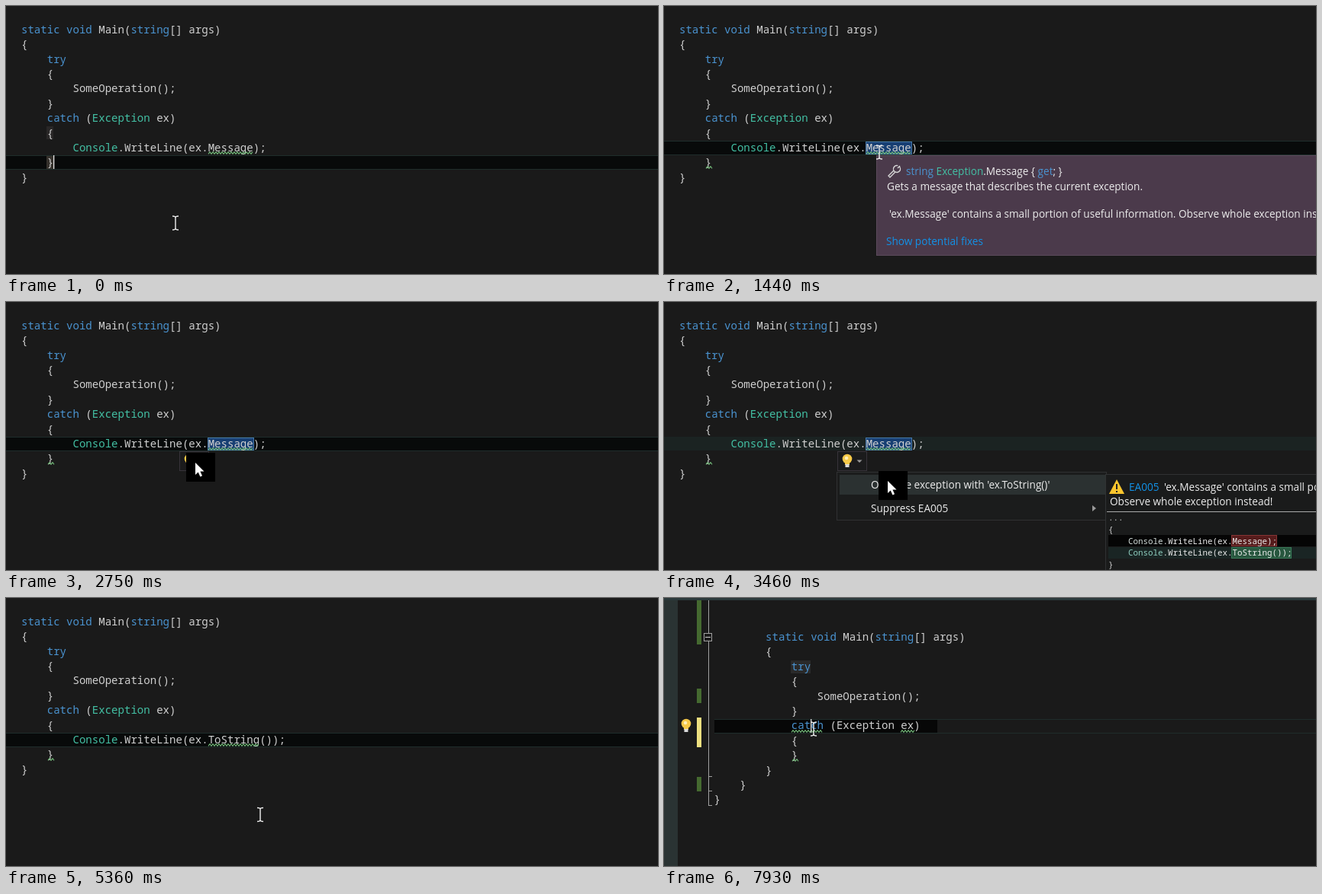
An HTML page with a canvas for the animation above (8000 ms loop, 854 by 352 pixels).

```html
<!DOCTYPE html>
<html lang="en">
<head>
<meta charset="utf-8">
<style>
html, body { margin: 0; width: 100%; height: 100%; overflow: hidden; background: #1a1a1a; }
canvas { display: block; }
</style>
</head>
<body>
<canvas id="stage" width="854" height="352"></canvas>
<script>
const c = document.getElementById('stage').getContext('2d');
const LOOP = 8000, PITCH = 19.4;
const MONO = '"Noto Sans Mono", "DejaVu Sans Mono", monospace';
const CODE = '14.07px ' + MONO, SMALL = '500 10.83px ' + MONO;
const UI = '13.6px "Open Sans", "Noto Sans", sans-serif';
const BG = '#1a1a1a', TEXT = '#d0d0d0', WHITE = '#ececec', BLUE = '#4a93d0', TEAL = '#43c0a4', LINK = '#1292e8';

// time, x, y of the pointer
const PATH = [
  [130, 222, 285], [740, 300, 190], [790, 300, 190], [930, 305, 205],
  [1030, 305, 205], [1250, 282, 192], [2230, 282, 192], [2600, 248, 211],
  [3110, 248, 211], [3140, 256, 214], [3340, 256, 214], [3460, 293, 235],
  [3710, 308, 236], [4869, 308, 236], [4870, 305, 240], [5150, 305, 240],
  [5790, 390, 375], [7109, 390, 375], [7110, 330, 262], [7850, 190, 169],
  [7900, 190, 169], [7930, 196, 172]
];

function pointer(t) {
  const i = PATH.findIndex(p => p[0] > t);
  if (i === 0) return PATH[0].slice(1);
  if (i < 0) return PATH[PATH.length - 1].slice(1);
  const [t0, x0, y0] = PATH[i - 1], [t1, x1, y1] = PATH[i];
  const k = (t - t0) / (t1 - t0);
  return [x0 + (x1 - x0) * k, y0 + (y1 - y0) * k];
}

function rect(x, y, w, h, fill, stroke) {
  c.fillStyle = fill;
  c.fillRect(x, y, w, h);
  if (stroke) {
    c.strokeStyle = stroke;
    c.lineWidth = 1;
    c.strokeRect(x + .5, y + .5, w - 1, h - 1);
  }
}

function shape(points, fill) {
  c.fillStyle = fill;
  c.beginPath();
  points.forEach(([x, y]) => c.lineTo(x, y));
  c.fill();
}

function disc(x, y, r, fill) {
  c.fillStyle = fill;
  c.beginPath();
  c.arc(x, y, r, 0, 7);
  c.fill();
}

function label(s, x, y, color = WHITE, font = UI) {
  c.font = font;
  c.fillStyle = color;
  c.fillText(s, x, y);
  return x + c.measureText(s).width;
}

function code(s, x, y, font = CODE, type = TEAL, plain = TEXT) {
  for (const part of s.split(/\b(static|void|string|try|catch|get|Exception|Console)\b/)) {
    const color = /^(Exception|Console)$/.test(part) ? type
      : /^(static|void|string|try|catch|get)$/.test(part) ? BLUE : plain;
    x = label(part, x, y, color, font);
  }
}

function squiggle(x0, x1, y) {
  c.strokeStyle = '#72b878';
  c.lineWidth = 1.1;
  c.beginPath();
  for (let x = x0, i = 0; x <= x1; x += 2, i++) c.lineTo(x, y + (i % 2 ? -1.4 : 1.4));
  c.stroke();
}

function activeLine(y, x = 0, end = 854) {
  rect(x, y - 9, 854 - x, 19, '#1f2d2b');
  rect(x, y - 8, 854 - x, 17, end < 854 ? BG : '#080a0a');
  if (end < 854) rect(x, y - 8, end - x, 17, '#070707');
}

function caret(x, y) { rect(x, y - 9, 1.3, 18, '#e4e4e4'); }

function bulb(x, y) {
  disc(x, y - 2, 6.3, '#f7c948');
  rect(x - 3, y + 2, 6, 4, '#f7c948');
  rect(x - 2.5, y + 5, 5, 4, '#dcdcdc');
  disc(x - 1, y - 3, 2.3, '#fff0b8');
}

function ibeam(x, y) {
  c.strokeStyle = '#f0f0f0';
  c.lineWidth = 1.4;
  c.beginPath();
  for (const s of [-1, 1]) {
    c.moveTo(x - 4, y + s * 9);
    c.quadraticCurveTo(x, y + s * 9, x, y + s * 7);
    c.quadraticCurveTo(x, y + s * 9, x + 4, y + s * 9);
  }
  c.moveTo(x, y - 8);
  c.lineTo(x, y + 8);
  c.stroke();
}

function arrow(x, y) {
  rect(x - 12, y - 13, 38, 38, '#000');
  const outline = [[0, 0], [0, 16], [3.7, 12.5], [6.4, 18.5], [9, 17.3], [6.4, 11.5], [11.5, 11.5]];
  shape(outline.map(([a, b]) => [x + a, y + b]), '#fff');
}

function tooltip() {
  rect(278, 196, 580, 132, '#4b3a4b', '#5b4b5b');
  c.strokeStyle = '#d8d8d8';
  c.lineWidth = 1.4;
  c.beginPath();
  c.arc(305, 214, 4.5, -.9, 5);
  c.moveTo(306, 213); c.lineTo(309, 210);
  c.moveTo(301, 216); c.lineTo(294, 223); c.lineTo(296, 225); c.lineTo(303, 218);
  c.stroke();
  code('string Exception.Message { get; }', 317, 222, UI, TEAL, WHITE);
  label('Gets a message that describes the current exception.', 292, 242);
  label("'ex.Message' contains a small portion of useful information. Observe whole exception instead!", 295, 278);
  label('Show potential fixes', 291, 314, LINK);
}

function bulbButton() {
  rect(227, 196, 39, 26, '#1b1b1c', '#37333a');
  bulb(240, 208);
  shape([[252.5, 207.5], [259.5, 207.5], [256, 211]], '#999');
}

function menu() {
  rect(226, 223, 354, 64, '#1b1c1c', '#303132');
  rect(230, 227, 348, 26, '#2b3131');
  label("Observe exception with 'ex.ToString()'", 271, 245);
  label('Suppress EA005', 271, 276);
  shape([[561, 267], [566, 271], [561, 275]], '#999');
}

function preview() {
  rect(578, 226, 280, 130, '#1a1b1b', '#303233');
  shape([[593, 233], [603, 252], [583, 252]], '#fbc52d');
  rect(592, 239, 2, 7, '#222');
  rect(592, 248, 2, 2, '#222');
  label('EA005', 609, 248, LINK);
  label("'ex.Message' contains a small portion of useful information.", 655, 248);
  label('Observe whole exception instead!', 584, 267);
  rect(580, 275, 274, 1, '#aaa');
  rect(582, 306, 272, 15, '#050505');
  rect(582, 322, 272, 15, '#1a2524');
  rect(743, 306, 60, 15, '#561c1c', '#873535');
  rect(743, 322, 79, 15, '#28573f', '#387a58');
  label('...', 582, 287, TEXT, SMALL);
  label('{', 582, 303, TEXT, SMALL);
  code('Console.WriteLine(ex.Message);', 608, 318, SMALL, '#d4dedb', WHITE);
  code('Console.WriteLine(ex.ToString());', 608, 333, SMALL, '#8fcfc0', WHITE);
  label('}', 582, 349, TEXT, SMALL);
}

function editor(t) {
  const clicked = t >= 740, marked = t >= 1410 && t < 5130;
  const menuOpen = t >= 2950 && t < 5130, fixed = t >= 5130;
  if (!clicked) {
    activeLine(205);
    rect(53, 158, 9, 17, '#292727');
    rect(53, 197, 9, 17, '#34302b');
  } else if (menuOpen) {
    rect(0, 177, 854, 18, '#1b2322');
  } else {
    activeLine(186);
  }
  if (marked) rect(264, 178, 61, 17, '#173f73', '#4778a8');

  const lines = ['static void Main(string[] args)', '{', '    try', '    {',
    '        SomeOperation();', '    }', '    catch (Exception ex)', '    {',
    `        Console.WriteLine(ex.${fixed ? 'ToString()' : 'Message'});`, '    }', '}'];
  lines.forEach((s, i) => code(s, 20, 35.7 + i * PITCH));

  if (!fixed) squiggle(265, 324, 193);
  else if (t < 6350) squiggle(265, 331, 193);
  if (clicked) squiggle(55, 63, 212);

  if (!clicked) caret(62, 205);
  else if (t < 1250 || (t >= 1800 && t < 2230) || t >= 6350) caret(298.5, 185);

  if (t >= 1470 && t < 5130) bulbButton();
  if (t >= 1410 && t < 2450) tooltip();
  if (menuOpen) menu();
  if (t >= 3110 && menuOpen) preview();
}

function fullEditor() {
  rect(0, 0, 18, 352, '#2a3333');
  rect(0, 0, 854, 3, '#2b393b');
  for (const [y, h] of [[3, 58], [119, 19], [235, 19]]) rect(43, y, 6, h, '#456a30');
  rect(43, 157, 6, 39, '#eee080');
  activeLine(168, 66, 358);
  rect(166, 82, 26, 17, '#2a2a2a');

  rect(58, 3, 1, 270, '#a0a0a0');
  for (const y of [234, 253, 272]) rect(58, y, 5, 1, '#a0a0a0');
  rect(52, 46, 11, 11, BG, '#a0a0a0');
  rect(54, 51, 7, 1, '#d0d0d0');
  bulb(29, 167);

  const lines = ['        static void Main(string[] args)', '        {', '            try',
    '            {', '                SomeOperation();', '            }',
    '            catch (Exception ex)', '            {', '            }',
    '        }', '    }', '}'];
  lines.forEach((s, i) => code(s, 65.6, 56 + i * PITCH, CODE, TEXT));
  squiggle(167, 208, 175);
  squiggle(310, 328, 175);
  squiggle(168, 176, 213);
  caret(192, 168);
}

function draw(now) {
  const t = now % LOOP;
  rect(0, 0, 854, 352, BG);
  if (t < 7110) editor(t); else fullEditor();
  const [x, y] = pointer(t);
  if (t >= 2600 && t < 4870) arrow(x, y); else ibeam(x, y);
}

const start = performance.now();
function tick() {
  draw(performance.now() - start);
  requestAnimationFrame(tick);
}
tick();
</script>
</body>
</html>
```
